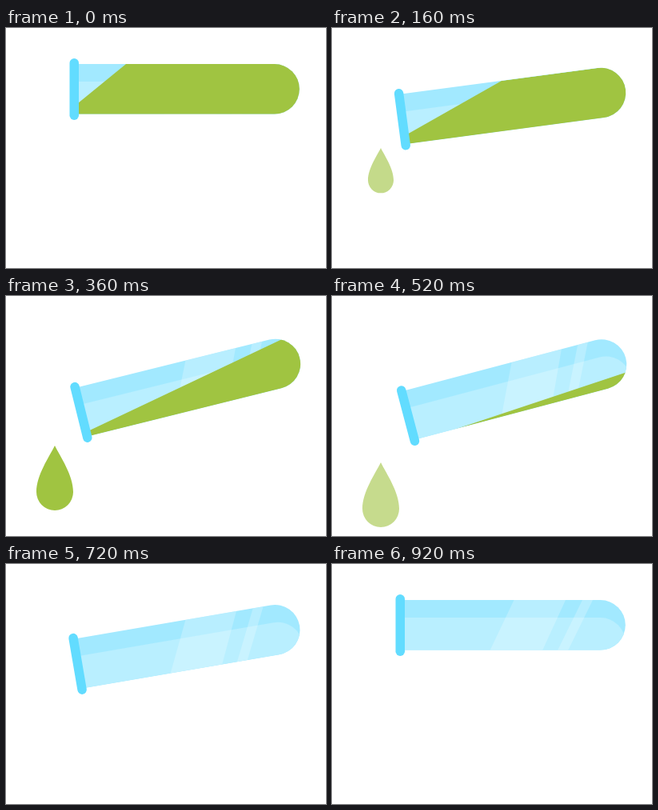
Write an HTML page that moves like this. It is 400x300 px and loops after 1 s.

```html
<!DOCTYPE html>
<html lang="en">
<head>
<meta charset="utf-8">
<title>Test tube</title>
<style>
  html, body { margin: 0; height: 100%; overflow: hidden; background: #fff; }
  svg { display: block; width: 100%; height: 100%; }
</style>
</head>
<body>
<svg viewBox="0 0 400 300">
  <defs>
    <path id="glass" d="M90 45H335.5A31.3 31.3 0 0 1 335.5 107.6H90Z"/>
    <clipPath id="inside"><use href="#glass"/></clipPath>
  </defs>
  <g id="tube">
    <use href="#glass" fill="#a2e9ff"/>
    <g clip-path="url(#inside)">
      <use href="#glass" y="22" fill="#b9efff"/>
      <path d="M227.500 45H292L263 108H197.500ZM313 45H326L295 108H282Z" fill="#fff" opacity=".23"/>
      <path id="liquid" fill="#a0c441"/>
    </g>
    <rect x="79.500" y="38" width="11.500" height="77" rx="5.750" fill="#62dcff"/>
  </g>
  <path id="drop" fill="#a0c441" d="M0 0C7 14 23 37 23 58A23 23 0 0 1 -23 58C-23 37 -7 14 0 0Z"/>
</svg>
<script>
const [tube, liquid, drop] = ['tube', 'liquid', 'drop'].map(id => document.getElementById(id));
const LOOP = 1000, STEP = 40, PEAK = 475, END = 920;

// Liquid surface: time, right end x, right end y, left end y
const surface = [
  [0, 150, 45, 94],
  [160, 214.6, 45, 95.4],
  [280, 279.2, 45, 99.9],
  [360, 367, 45, 101.1],
  [520, 367, 93.5, 111],
  [600, 367, 119, 116]
];

const clamp = v => Math.max(0, Math.min(1, v));

function surfaceAt(t) {
  const i = Math.max(1, surface.findIndex(k => k[0] >= t));
  const a = surface[i - 1], b = surface[i];
  const u = clamp((t - a[0]) / (b[0] - a[0]));
  return a.map((v, j) => v + (b[j] - v) * u);
}

function tilt(t) {
  const u = t < PEAK ? t / PEAK : 1 + (t - PEAK) / (END - PEAK);
  return -15 * Math.sin(u * Math.PI / 2);
}

function draw(t) {
  tube.setAttribute('transform', `rotate(${tilt(t)} 371.5 75.3)`);

  const full = t < 600;
  liquid.setAttribute('visibility', full ? 'visible' : 'hidden');
  if (full) {
    const [, x, y, left] = surfaceAt(t);
    liquid.setAttribute('d', `M90 ${left}L${x} ${y}H400V130H90Z`);
  }

  const size = clamp(t / 230);
  const fall = 105.5 + 0.2924 * t - 0.0001833 * t * t + 8 * (1 - size);
  drop.setAttribute('transform', `translate(61 ${fall}) scale(${size})`);
  drop.setAttribute('opacity', Math.min(clamp(t / 260), clamp((640 - t) / 200)));
}

function tick() {
  const t = performance.now() % LOOP;
  draw(Math.min(END, Math.floor(t / STEP) * STEP));
  requestAnimationFrame(tick);
}
tick();
</script>
</body>
</html>
```
